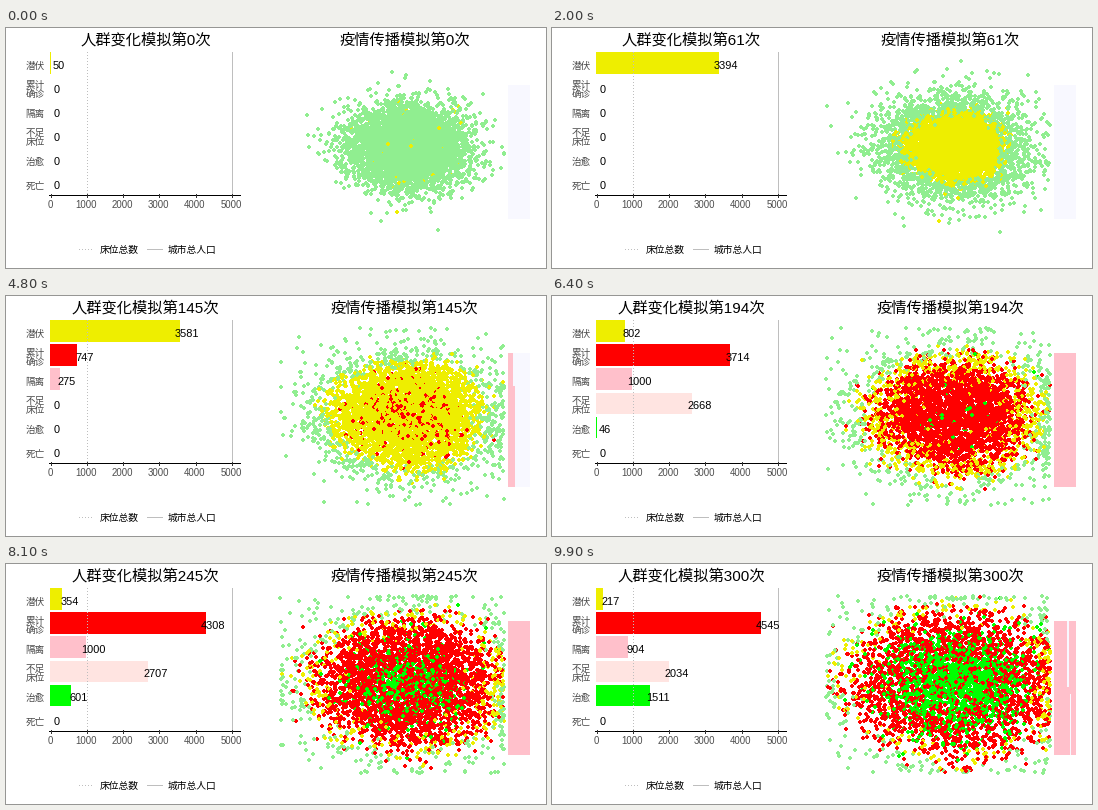
A matplotlib script for the animation above (10 s loop, 540 by 240 pixels).

```python
import numpy as np
import matplotlib.pyplot as plt
from matplotlib.animation import FuncAnimation
from matplotlib.patches import Rectangle

W, H, DPI = 540, 240, 100
FRAMES, INTERVAL = 100, 100
PEOPLE, BEDS, SEEDS = 5000, 1000, 50
ADMISSION_DELAY = 10.22
PX = 72 / DPI
plt.rcParams["font.family"] = ["Liberation Sans", "Noto Sans CJK JP"]

days = np.round(np.linspace(0, 300, FRAMES)).astype(int)


def logistic(when, **keys):
    """Head count following logistic growth between the key days (d61=3394, ...)."""
    share = np.maximum(list(keys.values()), 0.1) / PEOPLE
    logit = np.interp(when, [int(k[1:]) for k in keys], np.log(share / (1 - share)))
    return np.round(PEOPLE / (1 + np.exp(-logit))).astype(int)


def confirmed_at(when):
    return logistic(when, d61=0, d145=747, d194=3714, d221=4171, d270=4430, d300=4545)


infected = logistic(days, d0=SEEDS, d61=3394, d145=4328, d194=4516, d221=4605, d270=4714, d300=4762)
confirmed = confirmed_at(days)
cured = logistic(days, d145=0, d194=46, d221=330, d270=1069, d300=1511)
emptied = np.round(96 * np.clip((days - 291) / 9, 0, 1)).astype(int)
admitted = np.minimum(BEDS, confirmed_at(days - ADMISSION_DELAY)) - emptied
shortage = np.maximum(0, confirmed - cured - BEDS)
totals = np.stack([infected - confirmed, confirmed, admitted, shortage, cured, 0 * days], axis=1)

# The crowd drifts outwards with a little jitter and stops at the city limits
rng = np.random.default_rng(7)
center = np.array([402, 119])
low, high = np.array([274, 32]), np.array([498, 209])
start, rate = np.array([841, 420]), np.array([5.6, 2.7])


def variance(day):
    return start + rate * day


walk = np.empty((FRAMES, PEOPLE, 2))
walk[0] = np.clip(center + rng.normal(size=(PEOPLE, 2)) * np.sqrt(start), low, high)
for i in range(1, FRAMES):
    gain = rate * (days[i] - days[i - 1])
    growth = np.sqrt(1 + 0.75 * gain / variance(days[i - 1]))
    jitter = rng.normal(size=(PEOPLE, 2)) * np.sqrt(0.25 * gain)
    moved = center + (walk[i - 1] - center) * growth + jitter
    inside = ((moved >= low) & (moved <= high)).all(axis=1, keepdims=True)
    walk[i] = np.where(inside, moved, walk[i - 1])

# Infection spreads outwards from the crowded core
infection_day = np.full(PEOPLE, np.inf)
infection_day[rng.choice(PEOPLE, SEEDS, replace=False)] = 0
noise = rng.normal(0, 0.15, PEOPLE)
for i in range(1, FRAMES):
    dx, dy = ((walk[i] - center) / np.sqrt(variance(days[i]))).T
    angle = np.arctan2(dy, dx)
    score = np.hypot(dx, dy) + noise + 0.1 * np.sin(3 * angle + 1) + 0.08 * np.sin(7 * angle)
    score[np.isfinite(infection_day)] = np.inf
    fresh = infected[i] - np.isfinite(infection_day).sum()
    infection_day[np.argsort(score)[:fresh]] = days[i]
onset = np.argsort(infection_day + rng.normal(0, 18, PEOPLE))

HEALTHY, LATENT, ILL, CURED, IN_BED = range(5)
palette = np.array([[144, 238, 144], [238, 238, 0], [255, 0, 0], [0, 255, 0]]) / 255


def health(i):
    state = np.where(infection_day <= days[i], LATENT, HEALTHY)
    c, a = cured[i], admitted[i]
    state[onset[:c]] = CURED
    state[onset[c:c + a]] = IN_BED
    state[onset[c + a:confirmed[i]]] = ILL
    return state


fig = plt.figure(figsize=(W / DPI, H / DPI), dpi=DPI, facecolor="white")
ax = fig.add_axes([0, 0, 1, 1])
ax.set(xlim=(0, W), ylim=(H, 0))
ax.axis("off")


def label(x, y, text, size, color="black", ha="center"):
    return ax.text(x, y, text, fontsize=size * PX, color=color, ha=ha, va="baseline")


def line(xs, ys, color, **kw):
    ax.plot(xs, ys, color=color, lw=0.95 * PX, antialiased=False, **kw)


def box(x, y, w, h, color):
    return ax.add_patch(Rectangle((x, y), w, h, fc=color, lw=0, antialiased=False))


# Bar chart
X0, UNIT, TOP, ROW, THICK = 44, 181.5 / 5000, 24.25, 24.1, 21.7
GRAY, DARK = "#BEBEBE", "#4D4D4D"
DOTS = (0, (1, 3))
names = ["潜伏", "累计\n确诊", "隔离", "不足\n床位", "治愈", "死亡"]
colors = ["#EEEE00", "#FF0000", "#FFC0CB", "#FFE4E1", "#00FF00", "black"]
bars, values = [], []
for k, (name, color) in enumerate(zip(names, colors)):
    top, bottom = round(TOP + k * ROW), round(TOP + k * ROW + THICK)
    bars.append(box(X0, top, 0, bottom - top, color))
    y = 37 + 24 * k
    rows = name.split("\n")
    for j, part in enumerate(rows):
        label(38.8, y + 9 * (j - (len(rows) - 1) / 2) + 3.6, part, 9.6, DARK, "right")
    values.append(label(X0, y + 4, "0", 11))

line([80.5, 80.5], [24, 166], GRAY, ls=DOTS)
line([225.5, 225.5], [24, 166], GRAY)
line([43, 234], [166.5, 166.5], "black")
for v in range(0, 5001, 1000):
    x = int(X0 + v * UNIT) + 0.5
    line([x, x], [166, 169], "#333333")
    label(x - 0.5, 180, str(v), 9.6, DARK)

line([73, 88], [220.5, 220.5], GRAY, ls=DOTS)
label(94, 225, "床位总数", 9.8, ha="left")
line([141, 156], [220.5, 220.5], GRAY)
label(162, 225, "城市总人口", 9.8, ha="left")

# City map and hospital
box(502, 57, 22, 134, "#F8F8FF")
bed = np.arange(BEDS)
bed_xy = np.stack([502.9 + 2.1 * (bed // 100), 188.9 - 1.32 * (bed % 100)], axis=1)
beds = ax.scatter([], [], s=(3 * PX) ** 2, marker="s", c="#FFC0CB", lw=0, antialiased=False)
crowd = ax.scatter([], [], s=(2.6 * PX) ** 2, lw=0, antialiased=False, zorder=2)

title_left = label(139.5, 17, "", 15.3)
title_right = label(398.5, 17, "", 15.3)


def update(i):
    title_left.set_text(f"人群变化模拟第{days[i]}次")
    title_right.set_text(f"疫情传播模拟第{days[i]}次")
    for bar, value, n in zip(bars, values, totals[i]):
        bar.set_width(max(0, n * UNIT - 0.45))
        value.set_text(str(n))
        value.set_x(X0 + n * UNIT + 7)
    # Beds fill column by column; the first ones to empty start at bed 650
    gap = (bed >= 650) & (bed < 650 + emptied[i])
    beds.set_offsets(bed_xy[(bed < admitted[i] + emptied[i]) & ~gap])
    state = health(i)
    outside = state != IN_BED
    crowd.set_offsets(np.round(walk[i][outside]))
    crowd.set_facecolors(palette[state[outside]])
    return [title_left, title_right, *bars, *values, beds, crowd]


anim = FuncAnimation(fig, update, frames=FRAMES, interval=INTERVAL, repeat=True, repeat_delay=0)
plt.show()
```
